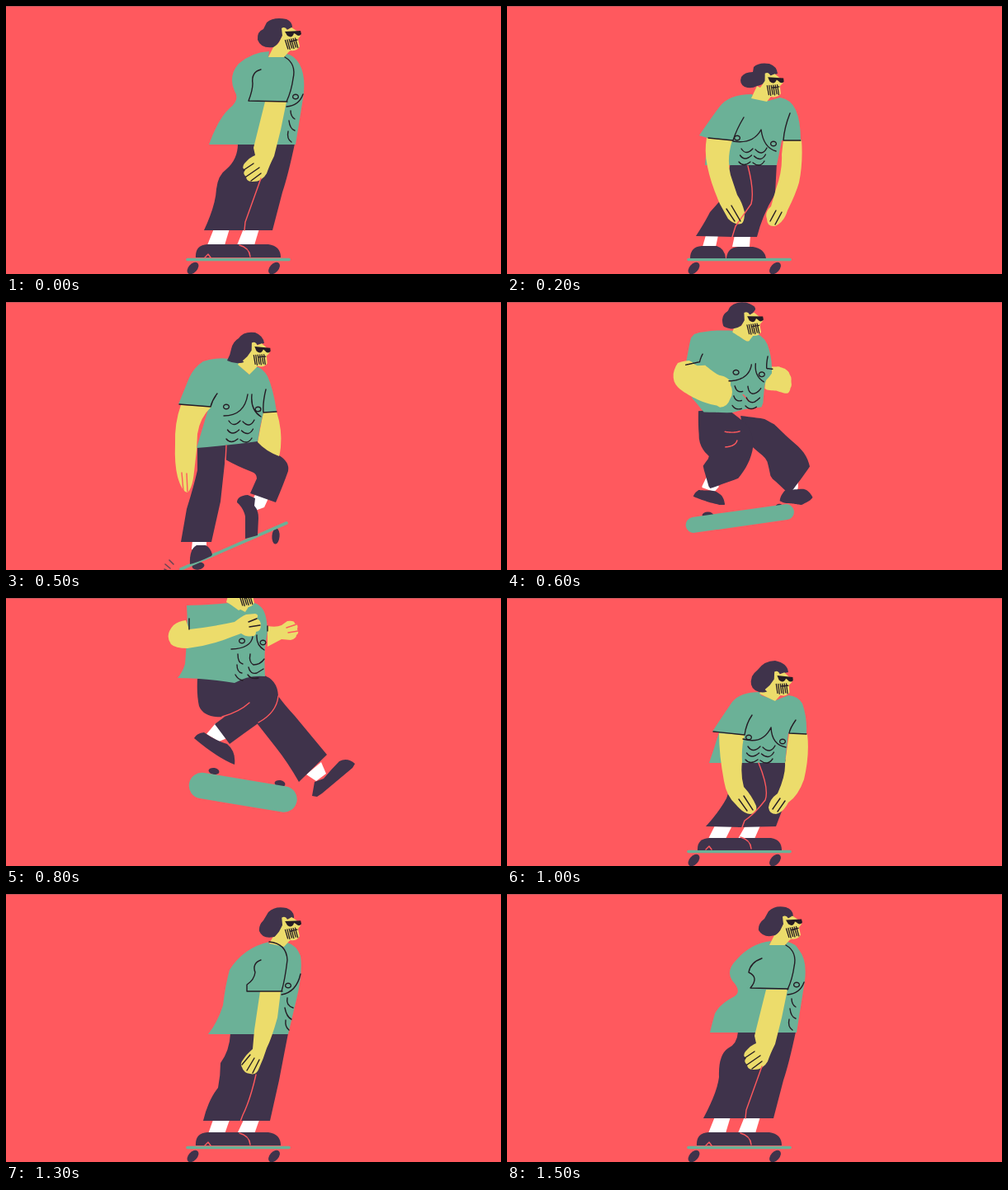
Recreate the animation shown at these times as an HTML page. Size 600 by 325 pixels, loop 1.6 s.

```html
<!DOCTYPE html>
<html lang="en">
<head>
<meta charset="utf-8">
<title>Skater</title>
<style>
html, body { margin: 0; width: 100%; height: 100%; overflow: hidden; background: #ff595e; }
svg { display: block; width: 100vw; height: 100vh; }
</style>
</head>
<body>
<svg id="stage" viewBox="0 0 600 325"></svg>
<script>
const RED = '#ff595e', TEAL = '#6bb197', NAVY = '#3f334b', SKIN = '#ecdc6b', INK = '#251c25';
const STEP = 100, COUNT = 16;
const stage = document.getElementById('stage');

const ring = (x, y) => `M${x - 3.4} ${y}a3.4 2.8 0 1 0 6.8 0a3.4 2.8 0 1 0 -6.8 0`;
const cups = (x, y, w, gap, row) => [0, 1, 2].map(i =>
  `M${x - i * 1.5} ${y + i * row}q${w * .4} ${9 - i} ${w} 0` +
  `M${x + w + gap - i * 1.5} ${y + 1 + i * row}q${w * .6} ${9 - i} ${w} -2`).join('');

const ground = {
  board: [220, 307.5, 343, 307.5, 3.6],
  wheelL: [226.5, 318, 8.5, 5.3, -48],
  wheelR: [325, 318, 8.5, 5.3, -48]
};
const ride = {
  ...ground,
  shoeL: 'M230 305Q229 290 244 289L285 289Q298 294 297 305Z',
  shoeR: 'M250 305L252 290L285 289L318 289Q333 291 333 305Z'
};
const toe = 'M283 290Q295 293 296 304M241 305L245 301L248 305';

const stand = {
  ...ride,
  face: [0, 0, 0],
  neck: 'M326 46L318 62L337 62L346 52Z',
  sockL: 'M252 270L271 270L265 290L244 290Z',
  sockR: 'M288 270L307 270L301 290L280 290Z',
  legL: 'M281 167L322 167L309 207L290 262L289 272L240 272Q254 242 255 222Q257 205 267 198Q281 186 281 167Z',
  legR: 'M300 167L350 167Q342 205 335 226L323 272L285 272Z',
  crease: 'M309 209L290 262L289 272' + toe,
  armR: 'M325 110L345 110L345 135L341 160L330 160Z',
  shirt: 'M319 55Q298 56 282 70Q269 85 277 103Q284 114 271 124Q257 137 246 168L351 168L360 112Q364 86 356 71Q350 60 340 58L337 62L318 62Z',
  armL: 'M314 116L340 116L333 150L325 182Q319 194 316 203Q310 214 297 213Q291 212 291 207Q286 203 290 199Q285 196 289 191Q296 183 302 181L300 172L308 140Z',
  ink: 'M309 77Q297 80 299 94Q299 102 294 115L341 116M338 62Q352 70 348 88Q346 103 340 116M360 107Q355 121 340 122' + ring(351, 110),
  belly: 'M345 127Q345 134 350 137M343 139Q344 149 350 151M342 152Q340 161 346 165',
  handL: 'M288 199L300 191M291 207L307 196M297 212L309 203',
  handR: '',
  hair: 'M316 20Q324 13 340 16Q347 19 347 26L338 30L334 38Q330 47 324 50Q309 52 305 41Q304 31 312 28Z'
};

const crouch = {
  ...ground,
  face: [-23, 56, 7],
  neck: 'M303 97L296 112L315 116L322 107Z',
  shoeL: 'M222 306Q222 292 236 291L254 291Q264 294 265 306Z',
  shoeR: 'M266 306Q267 293 280 292L298 292Q312 294 314 306Z',
  sockL: 'M241 278L256 278L253 292L237 292Z',
  sockR: 'M276 278L295 278L294 292L273 292Z',
  legL: 'M271 190L292 190Q300 225 296 240L276 268L273 280L229 279Q240 262 246 250L262 232Z',
  legR: 'M285 190L327 190L325 228Q310 252 303 280L270 280Z',
  crease: 'M292 194Q300 225 296 240L277 267L273 280',
  armR: 'M335 162L357 162Q359 190 354 214Q350 228 340 248Q336 262 325 267Q315 268 315 258Q312 250 320 243L326 222Q334 200 333 180Z',
  shirt: 'M297 107Q268 107 257 123Q246 138 233 157L243 160L240 193L327 193L333 163L356 163Q356 140 350 126Q344 113 331 111L317 115L300 112Z',
  armL: 'M242 160L273 163Q266 185 271 205L279 229Q285 238 288 250Q288 262 284 264Q276 266 268 258L258 240Q247 215 243 195Q239 178 242 160Z',
  ink: 'M287 135Q278 150 274 163L244 160M343 130Q336 148 335 163L356 163M274 164Q298 168 308 150' +
    ring(279, 160) + 'M308 150Q311 172 326 176' + ring(323, 167),
  belly: cups(284, 173, 14, 3, 8),
  handL: 'M266 246L276 261M272 242L283 261',
  handR: 'M326 248L319 261M333 250L325 265',
  hair: 'M299 74Q305 68 318 70Q327 73 328 82L318 85L314 91Q310 96 303 97Q296 101 288 98Q281 94 284 86Q288 80 298 80Z'
};

const pop = {
  board: [212, 324, 340, 268, 3.6],
  wheelL: [233, 320, 7.5, 4.6, -10],
  wheelR: [327, 284, 4.6, 9.5, 4],
  face: [-38, 24, 8],
  neck: 'M285 68L281 76L295 88L304 79L303 72Z',
  shoeL: 'M223 318Q222 300 231 295L242 295Q248 298 250 306L249 308Q232 316 223 318Z',
  shoeR: 'M280 243Q280 235 293 234L302 238L301 247Q306 252 306 262L305 283L290 287L290 260Q288 250 280 243Z',
  sockL: 'M226 289L243 289L243 301L225 300Z',
  sockR: 'M304 230L319 236L313 249L302 253L297 243Z',
  legL: 'M232 175L267 172L265 196L260 242L249 291L212 291L219 251Q228 222 232 204Z',
  legR: 'M262 173L304 168Q312 177 331 186Q344 194 342 205Q336 222 327 243L296 232L304 214Q304 208 298 206Q280 199 266 191Z',
  crease: 'M267 174L266 194M213 207L215 229M219 208L220 230',
  armR: 'M312 133L328 133Q335 155 333 176Q332 184 331 187Q315 181 305 170Z',
  shirt: 'M283 71Q259 65 239 72Q228 79 222 92L209 124L246 127L231 177Q270 174 305 169Q308 150 312 134L328 133Q324 105 317 90Q311 80 303 78L295 88L283 77Z',
  armL: 'M212 125L249 127Q235 140 232 160L231 180L228 206Q226 226 220 231Q213 230 208 212Q204 196 205 173Q204 147 212 125Z',
  ink: 'M256 111Q250 119 248 127L210 124M315 106Q311 122 312 134L328 133M264 138Q289 138 293 112' +
    ring(267, 127) + 'M298 112Q296 131 309 139' + ring(305.5, 130),
  belly: cups(270, 144, 14, 3, 11),
  handL: '',
  handR: '',
  hair: 'M282 44Q288 35 302 37Q312 41 313 50L304 52L300 60Q297 67 291 72Q280 77 268 71Q272 64 273 57Q275 48 282 44Z'
};

const air = {
  board: [237.5, 227.5, 337, 244, 31.5],
  wheelL: [252, 210, 6.5, 4, 10],
  wheelR: [332, 225, 6.5, 4, 10],
  face: [-55, -43, 0],
  neck: 'M270 -6L267 5L290 17L297 6Z',
  shoeL: 'M228 170Q231 164 240 163Q254 173 268 177Q279 186 277 202Q255 193 228 170Z',
  shoeR: 'M371 240L374 223L385 219Q395 207 404 198Q414 193 423 201L420 206L383 237L377 241Z',
  sockL: 'M254 152L268 170L258 174L243 165Z',
  sockR: 'M364 214L382 199L388 213L376 222Z',
  legL: 'M232 98L310 93Q329 98 330 119Q327 139 307 151Q290 163 271 177L253 153L265 144Q240 146 234 131Q231 118 232 98Z',
  legR: 'M300 110L330 119Q338 130 350 143L389 190L355 223Q342 200 327 181L305 153Z',
  crease: 'M262 144Q283 138 295 127M306 151Q328 139 330 119M340 36L352 32M342 42L354 40',
  armR: 'M317 34Q328 36 334 33L341 28Q350 27 350 31Q355 32 353 38Q356 42 352 45Q352 49 345 51L334 50L317 59Z',
  shirt: 'M270 6Q240 9 219 9Q221 35 217 80Q214 90 208 97Q240 97 277 103Q294 93 314 95Q313 80 314 60L317 40Q316 16 308 10Q302 5 297 6L290 16Z',
  armL: 'M203 33Q209 28 218 27L222 38Q250 35 277 29Q286 22 291 20L302 19Q307 20 304 25Q309 27 309 33Q309 40 303 41Q303 47 298 46Q292 48 285 43L274 47Q250 57 220 61Q205 61 200 56Q192 45 203 33Z',
  ink: 'M222 25L222 38M317 34L317 40M273 62Q297 61 299 47' + ring(286, 52) + 'M304 45Q303 57 313 63' + ring(311.5, 54),
  belly: 'M281 68Q281 79 287 80M296 68Q294 78 300 81Q308 81 313 74M280 81Q280 90 286 91M294 84Q296 93 304 91L312 86' +
    'M278 93Q281 99 287 100M293 93Q297 99 306 97',
  handL: 'M294 29L304 25M295 35L308 33',
  handR: '',
  hair: 'M260 -23Q270 -32 290 -27Q294 -24 292 -17L282 -14L278 -6Q272 -1 266 -1Q254 -3 252 -10Q252 -17 260 -18Z'
};

const land = {
  ...ride,
  face: [-12, 64, 9],
  neck: 'M315 103L306 116L325 125L334 115Z',
  shoeL: 'M231 306Q230 292 245 291L285 291Q298 295 297 306Z',
  shoeR: 'M250 306L252 291L285 291L320 291Q333 293 333 306Z',
  sockL: 'M252 276L273 276L265 292L244 292Z',
  sockR: 'M289 276L307 276L300 292L280 292Z',
  legL: 'M282 196L306 196Q318 230 313 245Q300 262 288 270L285 278L241 277Q258 258 266 243Z',
  legR: 'M298 196L339 196L341 205L340 240L326 277L280 278Z',
  crease: 'M305 200Q318 232 313 245Q300 262 288 270L285 278' + toe,
  armR: 'M342 164L364 165Q367 190 360 220Q353 240 341 248Q335 260 326 262Q318 262 317 254Q318 244 328 237Q338 215 337 200Z',
  shirt: 'M306 114Q283 114 273 126Q262 142 249 162L257 163Q252 180 245 200L337 200L341 164L363 165Q364 145 358 128Q353 119 341 118L326 124L308 118Z',
  armL: 'M257 164L288 166Q284 180 285 198Q283 215 287 229Q297 240 302 252Q304 262 295 262Q287 262 277 250Q266 240 263 222Q257 190 257 164Z',
  ink: 'M297 142Q290 152 288 166L250 162M350 148Q343 158 342 164L363 165M286 171Q310 178 320 157' +
    ring(293, 169) + 'M320 157Q321 178 338 181' + ring(334, 174),
  belly: cups(292, 180, 15, 3, 8),
  handL: 'M281 244L291 258M287 240L298 257',
  handR: 'M331 243L322 256M337 246L328 259',
  hair: 'M304 87Q312 76 325 76Q340 79 341 90L331 92L327 100Q322 105 320 110Q312 118 301 112Q293 107 297 95Q299 91 304 87Z'
};

const rise = {
  ...stand,
  face: [0, 2, 1],
  neck: 'M326 48L319 60L337 64L346 54Z',
  sockL: 'M251 274L271 274L265 291L245 291Z',
  sockR: 'M288 274L307 274L301 291L280 291Z',
  legL: 'M272 169L318 169L304 218Q296 250 287 268L284 275L239 275Q245 250 257 235Q260 220 260 205Q271 190 272 169Z',
  legR: 'M300 169L342 169Q335 205 331 226L320 275L280 275Z',
  crease: 'M303 219Q296 250 287 268L284 276' + toe,
  shirt: 'M319 58Q288 65 271 92Q266 110 263 135Q257 155 245 170L342 170L352 128Q360 95 357 75Q352 62 341 59L337 63L318 60Z',
  armL: 'M308 118L333 118L329 150Q322 175 316 187Q312 200 306 213Q303 220 296 218Q288 217 286 210Q283 206 288 200Q291 195 299 188L301 165Z',
  ink: 'M309 80Q298 84 302 95Q301 104 292 110L292 118L335 118M319 58Q340 60 341 80Q338 105 334 118M357 97Q352 119 334 122' + ring(342, 111),
  belly: 'M341 126Q339 135 348 138M338 138Q340 149 346 152M339 153Q338 161 343 165',
  handL: 'M286 207L296 195M292 214L301 199M299 217L307 201',
  hair: 'M318 22Q326 14 340 17Q350 21 349 29L340 31L335 40Q331 50 325 52Q311 55 307 45Q306 38 312 32Z'
};

const settle = {
  ...stand,
  face: [0, .5, 0],
  legL: 'M280 167L322 167L309 207L290 262L289 272L238 272Q255 240 257 222Q256 195 268 187Q279 182 280 167Z',
  shirt: 'M320 57Q295 60 278 80Q265 93 273 105Q285 118 276 124Q258 133 252 145Q249 155 246 168L351 168L361 105Q364 80 354 68Q350 60 340 58L337 62L318 62Z',
  ink: stand.ink.replace('M309 77Q297 80 299 94Q299 102 294 115L341 116', 'M309 78Q295 83 293 95Q306 101 295 114L341 115'),
  hair: 'M317 21Q325 13 338 16Q347 19 347 27L338 31L334 39Q331 47 325 50Q311 54 305 44Q304 36 312 30Z'
};

const smooth = u => u * u * (3 - 2 * u);
const launch = u => u * (2 - u);
const keys = [
  [0, stand, smooth], [2, crouch, smooth], [5, pop, launch], [8, air, smooth],
  [10, land, smooth], [13, rise, smooth], [15, settle, smooth], [16, stand, smooth]
];

function add(tag, attrs, parent = stage) {
  const el = document.createElementNS('http://www.w3.org/2000/svg', tag);
  set(el, attrs);
  return parent.appendChild(el);
}
function set(el, attrs) {
  for (const k in attrs) el.setAttribute(k, attrs[k]);
}
const line = (color, width) => ({
  fill: 'none', stroke: color, 'stroke-width': width, 'stroke-linecap': 'round', 'stroke-linejoin': 'round'
});

add('rect', { width: 600, height: 325, fill: RED });
add('rect', { width: 600, height: 1, fill: '#c9585f' });
const wheels = { wheelL: add('ellipse', { fill: NAVY }), wheelR: add('ellipse', { fill: NAVY }) };
const deck = add('line', line(TEAL, 3));
const parts = {};
for (const [name, color] of [
  ['sockR', '#fff'], ['shoeR', NAVY], ['legR', NAVY], ['sockL', '#fff'], ['shoeL', NAVY], ['legL', NAVY],
  ['armR', SKIN], ['shirt', TEAL], ['armL', SKIN], ['neck', SKIN], ['hair', NAVY]
]) parts[name] = add('path', { fill: color });
for (const name of ['crease', 'ink', 'belly', 'handL', 'handR']) {
  parts[name] = add('path', line(name === 'crease' ? RED : INK, 1.4));
}

const face = add('g', {});
add('path', { fill: SKIN, d: 'M334 27Q338 24 341 29L346 26L352 30L357 36L354 40L356 49Q353 55 345 54L337 58L326 50L331 44L335 36Z' }, face);
add('path', { fill: INK, d: 'M338 31L357 30L358 34Q355 38 351 34L349 33Q347 40 341 36Z' }, face);
let hatch = 'M345 43L353 41';
for (let i = 0; i < 6; i++) hatch += `M${338.5 + i * 2.4} ${41.5 - i * .5}l3.3 ${10.5 + i % 2}`;
add('path', { ...line(INK, 1.3), d: hatch }, face);
const sparks = add('path', { ...line('#6b4554', 1.6), d: 'M193 318L199 323M198 313L203 318M192 324L196 326' });

const probe = document.createElementNS('http://www.w3.org/2000/svg', 'path');
function sample(d, n = 56) {
  probe.setAttribute('d', d);
  const len = probe.getTotalLength();
  return Array.from({ length: n + 1 }, (_, i) => probe.getPointAtLength(len * i / n));
}
const mix = (a, b, u) => a + (b - a) * u;
const mixAll = (a, b, u) => a.map((v, i) => mix(v, b[i], u));

function morph(a, b, u) {
  if (u === 0 || a === b) return a;
  const from = a.split('M').slice(1), to = b.split('M').slice(1);
  return from.slice(0, to.length).map((d, i) => {
    const end = sample('M' + to[i]);
    return 'M' + sample('M' + d).map((p, j) =>
      mix(p.x, end[j].x, u).toFixed(1) + ' ' + mix(p.y, end[j].y, u).toFixed(1)).join('L');
  }).join('');
}

function draw(n) {
  const k = keys.findIndex((key, i) => n >= key[0] && n < keys[i + 1][0]);
  const [start, a, ease] = keys[k], [stop, b] = keys[k + 1];
  const u = ease((n - start) / (stop - start));
  for (const name in parts) set(parts[name], { d: morph(a[name], b[name], u) });

  const [x1, y1, x2, y2, width] = mixAll(a.board, b.board, u);
  set(deck, { x1, y1, x2, y2, 'stroke-width': width });
  for (const name in wheels) {
    const [x, y, rx, ry, turn] = mixAll(a[name], b[name], u);
    set(wheels[name], { rx, ry, transform: `translate(${x} ${y}) rotate(${turn})` });
  }
  const [dx, dy, tilt] = mixAll(a.face, b.face, u);
  set(face, { transform: `translate(${dx} ${dy}) rotate(${tilt} 345 40)` });
  set(sparks, { visibility: n === 5 ? 'visible' : 'hidden' });
}

let shown = -1;
const begin = performance.now();
function tick() {
  const n = Math.floor(Math.max(0, performance.now() - begin) / STEP) % COUNT;
  if (n !== shown) draw(shown = n);
  requestAnimationFrame(tick);
}
tick();
</script>
</body>
</html>
```
